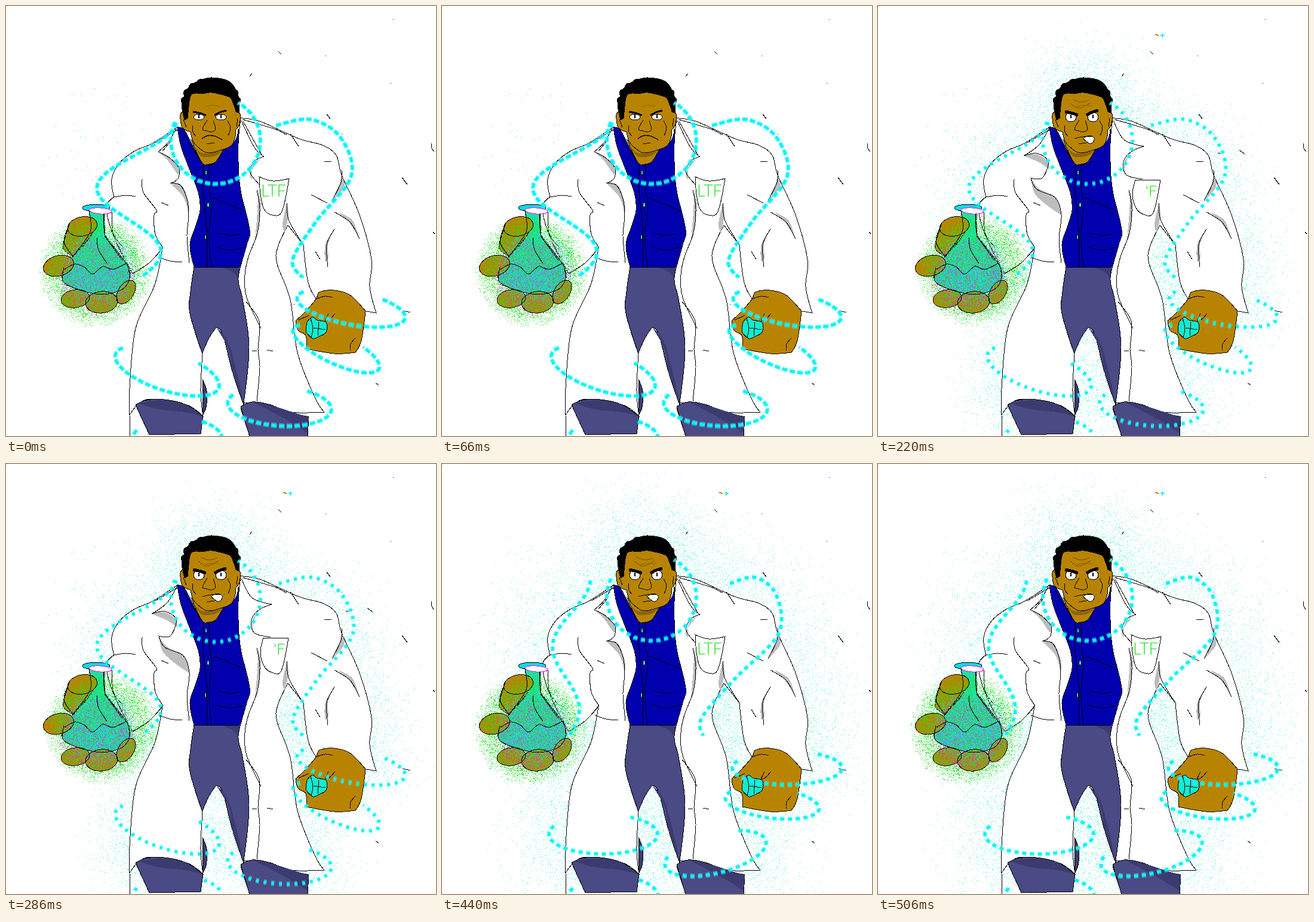
An HTML page that plays this animation: 720 by 720 pixels, repeating every 0.55 s.

```html
<!DOCTYPE html>
<html lang="en">
<head>
<meta charset="utf-8">
<title>Scientist with a flask</title>
<style>
html, body { margin: 0; width: 100%; height: 100%; overflow: hidden; background: #fff; }
svg { display: block; width: 100vw; height: 100vh; }
text { font-family: Lato, "Open Sans", sans-serif; font-weight: 300; fill: #1be01b; }
</style>
</head>
<body>
<svg id="stage" viewBox="0 0 720 720"></svg>
<script>
const STEP = 110, POSES = 5;
const SKIN = '#b88400', BLUE = '#0000ae', PANTS = '#4a4a84', DARK = '#3b3b70', GREY = '#bdbdbd', TEAL = '#10ecd0';
const stage = document.getElementById('stage');
const views = Array.from({ length: POSES }, () => []);

function add(parent, tag, attrs, text) {
  const el = document.createElementNS('http://www.w3.org/2000/svg', tag);
  for (const k in attrs) el.setAttribute(k, attrs[k]);
  if (text) el.textContent = text;
  parent.appendChild(el);
  return el;
}
// A layer without poses is always visible.
function layer(...poses) {
  const g = add(stage, 'g', { 'shape-rendering': 'crispEdges' });
  poses.forEach(i => views[i].push(g));
  return g;
}

// Smooth curve through "x,y" points; "!" marks a corner.
function curve(src, closed) {
  const p = src.split(' ').map(s => {
    const [x, y] = s.replace('!', '').split(',').map(Number);
    return { x, y, hard: s.endsWith('!') };
  });
  const n = p.length;
  const at = i => closed ? p[(i + n) % n] : p[Math.max(0, Math.min(n - 1, i))];
  const slope = i => {
    if (at(i).hard) return [0, 0];
    const a = at(i - 1), b = at(i + 1);
    return [(b.x - a.x) / 6, (b.y - a.y) / 6];
  };
  let d = `M${p[0].x} ${p[0].y}`;
  for (let i = 0; i < (closed ? n : n - 1); i++) {
    const a = at(i), b = at(i + 1), u = slope(i), v = slope(i + 1);
    d += `C${a.x + u[0]} ${a.y + u[1]} ${b.x - v[0]} ${b.y - v[1]} ${b.x} ${b.y}`;
  }
  return d + (closed ? 'Z' : '');
}
const shape = (g, src, fill, stroke = '#000') =>
  add(g, 'path', { d: curve(src, true), fill, stroke });
const lines = (g, src, stroke = '#000', width = 1) =>
  add(g, 'path', { d: src.split('|').map(s => curve(s)).join(''), fill: 'none', stroke, 'stroke-width': width });
const oval = (g, cx, cy, rx, ry, fill, turn = 0, stroke = '#000') =>
  add(g, 'ellipse', { cx, cy, rx, ry, fill, stroke, transform: `rotate(${turn} ${cx} ${cy})` });

function random(seed) {
  return () => {
    seed = seed + 0x6D2B79F5 | 0;
    let t = Math.imul(seed ^ seed >>> 15, 1 | seed);
    t = t + Math.imul(t ^ t >>> 7, 61 | t) ^ t;
    return ((t ^ t >>> 14) >>> 0) / 4294967296;
  };
}
// Single pixels placed by a rule that gets the random generator.
function dust(g, count, color, seed, place) {
  const rnd = random(seed);
  let d = '';
  for (let i = 0; i < count; i++) d += `M${place(rnd).map(Math.round).join(' ')}h1v1h-1z`;
  return add(g, 'path', { d, fill: color });
}
const disc = (x, y, r) => rnd => {
  const a = rnd() * 2 * Math.PI, q = r * Math.sqrt(rnd()) * (0.82 + 0.3 * rnd());
  return [x + q * Math.cos(a), y + q * Math.sin(a)];
};
const bell = rnd => (rnd() + rnd() + rnd() + rnd() - 2) * 1.7;

const auraLayers = [2, 3, 4].map(i => layer(i));

// Stray marks
const marks = layer();
lines(marks, '456,76 461,81|408,118 412,113|537,181 543,189|663,287 672,299|712,230 713,238 717,244|664,510 677,513|619,631 624,635|715,378 718,382');
dust(marks, 12, '#000', 9, r => [220 + 490 * r(), 620 * r() ** 2]);
dust(marks, 38, '#35e8e0', 5, disc(140, 230, 110));
dust(marks, 22, '#22e022', 6, disc(130, 220, 110));
add(marks, 'rect', { width: 1, height: 1, fill: '#ff8000' });
lines(layer(1, 2), '569,246 574,247|605,241 614,248');
const spark = layer(2, 3, 4);
lines(spark, '464,48 470,49', SKIN, 2);
lines(spark, '473,49 480,49|476,46 476,53', '#3fe8ff', 2);

// Shirt and trousers
const body = layer();
shape(body, '315,437! 390,437! 400,490 407,540 405,630 398,668! 379,612 363,550 352,538! 340,556 328,583! 308,515 309,478', PANTS);
shape(body, '352,538! 374,568 397,660! 379,612 374,577', DARK, 'none');
shape(body, '362,438! 391,438! 392,460! 380,446', DARK, 'none');
shape(body, '329,625! 336,645 335,672 329,685!', DARK);
shape(body, '286,203! 298,207 313,235 328,262 348,264 362,243 384,225 389,206! 396,300 412,370 392,438! 315,437! 304,410 318,340 290,270', BLUE);
lines(body, '331,266 330,310 336,370 337,437|341,265 341,310 345,330 340,385 344,437|346,321 404,345|355,380 375,384 392,382|352,403 375,409 397,404|297,212 313,240 330,262');
for (let i = 0; i < 3; i++) oval(body, 335 + i % 2 * 4 - i / 2, 279 + i * 54, 2, 4, '#35dfff');

// Coat
const coat = layer();
const coatLeft = shape(coat, '287,203! 245,230 215,243 190,263 177,290 181,320! 168,338 181,387 212,448! 240,430 262,405! 249,467 217,540 207,640 207,685! 235,659 300,667 330,687! 326,645 329,583! 308,515 309,478 315,437! 308,400 317,370 325,342 322,312 304,265 293,235', '#fff');
const coatRight = shape(coat, '393,188! 425,193 490,222 530,233 553,250 562,283 592,350 612,425 609,470 620,514! 603,511! 520,491! 506,463 498,400! 472,367! 455,404 454,432 476,492 488,580 517,655 533,680! 475,680 440,667 398,664! 407,570 396,490 389,455 403,400 408,375 394,315 390,285 389,230', '#fff');
shape(coat, '562,283! 566,303 546,326! 556,308', GREY, 'none');
shape(coat, '550,374! 539,398 540,422 534,428! 535,398', GREY, 'none');
shape(coat, '556,345! 580,359 592,390! 577,365', GREY, 'none');
shape(coat, '422,308! 427,335 423,368 417,390! 421,345', GREY, 'none');
shape(coat, '470,330! 473,350 467,380! 463,365', GREY, 'none');
lines(coat, '228,290 230,312 252,342 248,350 250,382 263,405|260,329 272,334|181,320 200,317 217,319|256,421 275,427 295,429|177,345 180,382 195,403');
lines(coat, '562,275 561,295 546,326|511,316 538,330|550,345 576,362 592,390|550,373 537,400 539,437|518,411 526,424|533,260 545,261|476,214 490,235|470,330 474,360 498,400');
lines(coat, '420,308 425,340 421,380 406,420 400,450 403,488 427,540|402,495 424,528 422,575 425,605 420,662|412,577 420,577|437,576 447,578|396,190 450,206 470,216|289,206 250,229|393,674 408,720|207,685 208,720');
shape(coat, '217,668! 235,660 265,659 300,667 330,687! 326,716! 240,718! 228,692', PANTS);
shape(coat, '222,665! 260,660 300,667 329,687! 300,680 255,675', DARK, 'none');
shape(coat, '393,671! 412,663 440,667 475,680 507,688! 505,721! 408,721!', PANTS);
shape(coat, '415,664! 445,669 507,689! 505,715! 465,690', DARK, 'none');

// Lapels
const calm = layer(0, 3, 4);
shape(calm, '255,244! 272,252 291,270! 288,282 272,260', GREY, 'none');
shape(calm, '275,297! 294,300 306,330 306,350! 297,320', GREY, 'none');
shape(calm, '427,255! 413,268 412,290! 408,280', GREY, 'none');
lines(calm, '285,205 272,228 255,244! 275,255 291,272! 288,289 275,297! 292,300 303,323 306,350 303,385 307,430|394,192 416,237 432,252! 416,260 409,279 424,299|277,225 262,243|397,193 428,249');
const gust = layer(1);
shape(gust, '278,287! 292,300 305,330 302,340! 291,310', GREY, 'none');
lines(gust, '287,204 250,235! 255,251 276,260 286,273 264,291! 276,306 294,313 306,345 303,390 307,430|394,192 411,220 437,229! 434,246 415,260 418,288 436,291');
const storm = layer(2);
shape(storm, '244,251! 265,248 284,260 287,274! 270,262', GREY, 'none');
shape(storm, '256,289! 270,306 299,323 307,350! 286,336 263,315', GREY, 'none');
shape(storm, '445,235! 420,252 413,276! 415,256', GREY, 'none');
lines(storm, '287,204 270,232 244,251! 267,247 285,261 275,288 256,288! 266,307 297,321 307,350 303,390 307,430|394,192 412,224 445,235! 424,244 411,261 416,283 443,290');

// Badge
const badge = layer(0, 3, 4), bent = layer(1, 2);
shape(badge, '424,286! 447,293 474,289! 462,344 446,350 432,340 426,315', '#fff');
shape(bent, '431,291! 473,291! 461,346 445,349 432,338 426,315', '#fff');
const label = (g, x, size, text) => add(g, 'text', { x, y: 319, 'font-size': size }, text);
label(badge, 427, 27, 'LTF');
label(layer(1), 432, 23, 'LTF');
label(layer(2), 448, 25, "'F");

// Head
const head = layer();
shape(head, '310,224! 328,262 340,265 352,260 364,240!', SKIN);
shape(head, '316,236! 330,247 361,243! 350,251 328,252', '#8c6400', 'none');
shape(head, '308,148! 340,144 376,151! 386,178! 392,181 391,198 385,207! 383,222 374,236 340,246 325,239 314,228 309,211! 295,203 292,182 298,178 304,188!', SKIN);
const hair = shape(head, '299,191! 294,165 299,150 305,137 317,128 343,120 375,127 389,151 391,165 390,178! 385,177! 382,164 375,153 345,145 329,147 315,146 308,154 304,188!', '#000');
for (let i = 0; i < 9; i++) {
  const a = Math.PI * (1.02 + i * 0.12);
  oval(head, 343 + 43 * Math.cos(a), 160 + 34 * Math.sin(a), 7, 6, '#000');
}
lines(head, '337,191 329,206 336,209 344,211 351,206 347,192|312,200 313,211 318,218|371,192 376,204 372,217|297,190 302,203|388,188 386,202|336,231 349,229');
lines(head, '333,169 345,166 358,168', '#8c6400');
function eyes(g, ry, brow) {
  for (const x of [323, 360]) {
    oval(g, x, 186, 9, ry, '#fff');
    oval(g, x, 185, 1, 3, '#087f9d');
  }
  lines(g, '313,177 323,179 335,183|349,183 358,178 369,175', '#000', brow);
}
eyes(layer(0, 1), 5, 3);
lines(layer(0), '328,222 338,217 350,218 362,224', '#000', 1.5);
lines(layer(1), '333,220 348,218 364,226', '#000', 3);
const angry = layer(2, 3, 4);
eyes(angry, 8, 5);
shape(angry, '343,222! 354,217 362,221 360,228 354,230', '#fff');
lines(angry, '329,222 343,219 360,219');
lines(angry, '322,163 335,171 345,168 356,162|326,156 340,161 354,157', '#7a5600');

// Fist with ring
const fist = layer();
shape(fist, '485,527! 500,513 519,491 525,479 549,476 576,484 602,511! 595,560 585,580! 550,582 503,574! 502,552 489,543', SKIN);
lines(fist, '518,491 534,486 547,488|523,531 540,526 551,515|540,515 532,532|576,577 577,566 585,556|490,526 507,518');
shape(fist, '503,547! 504,530 513,521 521,526 536,530 536,546 525,553 514,557', TEAL);
lines(fist, '510,523 514,540 511,555|515,539 535,542|524,529 522,552');

// Hand and flask
const hand = layer();
shape(hand, '97,440! 113,418 141,385 139,344! 164,346! 166,384! 188,413 205,438 206,460 190,477 150,482 98,464', '#1fe0a4');
shape(hand, '98,441! 115,432 131,437 145,449 162,436 179,441 203,430! 206,459 190,477 150,482 98,464', '#28cfc9');
shape(hand, '106,366! 97,395 97,408 113,420! 127,402 141,386 152,366!', SKIN);
oval(hand, 151, 338, 23, 6, '#08dce5');
oval(hand, 158, 343, 19, 5, '#fff', 4, '#f0f');
const fingers = [[128, 369, 25, 16, -12], [88, 435, 26, 17, -16], [116, 490, 24, 15, -8], [201, 479, 13, 22, 32], [160, 496, 27, 18, -6]];
for (const [x, y, rx, ry, turn] of fingers) oval(hand, x, y, rx, ry, SKIN, turn);

// Fizz around the flask: the cloud sways between poses
const sway = [0, -24, 10, -8, -2];
sway.forEach((dx, i) => {
  const g = layer(i);
  dust(g, 7600, '#1fe31f', 40 + i, disc(150 + dx, 443 - dx / 4, 86));
  dust(g, 2300, '#18e8d4', 60 + i, disc(158, 438, 60));
  dust(g, 1900, '#e22fe0', 50 + i, disc(152, 452, 64));
});
const ink = layer();
lines(ink, '139,344 141,378 113,418|97,438 98,464 150,482 190,477 206,460 205,438 188,413 166,384 164,346|98,441 115,432 131,437 145,449 162,436 179,441 203,430|212,448 240,430 263,405|106,366 97,395 113,420|165,385 195,426|152,388 155,408 169,431');
for (const [x, y, rx, ry, turn] of fingers) oval(ink, x, y, rx, ry, 'none', turn);

// Aura scattered around the outline of the figure
const rim = [coatLeft, coatRight, hair].flatMap(path => {
  const len = path.getTotalLength();
  return Array.from({ length: len / 8 | 0 }, (_, i) => path.getPointAtLength(i * 8));
});
auraLayers.forEach((g, i) => {
  const spread = i === 2 ? 48 : 36;
  dust(g, 15000 + i * 3000, '#4ff2cc', 20 + i, rnd => {
    const p = rim[rnd() * rim.length | 0];
    return [p.x + spread * bell(rnd), p.y + spread * bell(rnd)];
  });
});

// Energy trails: tilted rings around neck, wrist and legs, coils around the arms
const rad = Math.PI / 180;
function trace(point) {
  return 'M' + Array.from({ length: 41 }, (_, i) => point(i / 40).map(v => v.toFixed(1)).join(' ')).join('L');
}
const ring = (cx, cy, rx, ry, tilt) => trace(u => {
  const a = (205 - 265 * u) * rad, t = tilt * rad;
  const x = rx * Math.cos(a), y = ry * Math.sin(a);
  return [cx + x * Math.cos(t) - y * Math.sin(t), cy + x * Math.sin(t) + y * Math.cos(t)];
});
const coil = swing => trace(u => {
  const a = u * 2.35 * Math.PI;
  return [219 - 16 * u + swing * (66 - 14 * u) * Math.cos(a), 195 + 110 * a / Math.PI];
});
const armKeys = [[452, 200], [510, 190], [560, 220], [578, 285], [520, 360], [480, 425], [497, 455]];
const arm = (top, end) => curve(armKeys.map(([x, y], i) => `${x + top + (end - top) * i / 6},${y}`).join(' '));

const poses = [
  { tilt: 18, dash: 9, top: 0, end: 0, swing: 1, drop: 0 },
  { tilt: 8, dash: 9, top: 35, end: 85, swing: 1, drop: 15 },
  { tilt: 18, dash: 5, top: 5, end: 0, swing: 1, drop: 0 },
  { tilt: 12, dash: 6, top: 12, end: -14, swing: 1, drop: -2 },
  { tilt: 0, dash: 7, top: 30, end: -60, swing: 0.45, drop: -2 }
];
poses.forEach(({ tilt, dash, top, end, swing, drop }, i) => {
  const g = add(stage, 'g', { fill: 'none', 'stroke-dasharray': `${dash} ${13 - dash}` });
  views[i].push(g);
  const d = [
    ring(351, 225 + drop, 75, 73, 0), coil(swing), arm(top, end),
    ring(578, 509 - tilt / 5, 92, 28, tilt * 0.6), ring(553, 568 + tilt / 3, 79, 25, tilt + 7),
    ring(270, 620 - tilt / 2, 91, 33, tilt), ring(458, 652 + tilt, 87, 33, tilt - 14),
    ring(287, 725, 75, 35, 0)
  ].join('');
  add(g, 'path', { d, stroke: '#50ffff', 'stroke-width': 9, opacity: 0.4 });
  add(g, 'path', { d, stroke: '#00f5ff', 'stroke-width': 5 });
});

const all = new Set(views.flat());
function render(time) {
  const pose = Math.floor(time / STEP) % POSES;
  for (const g of all) g.style.display = views[pose].includes(g) ? '' : 'none';
}
const start = performance.now();
function tick() {
  render(performance.now() - start);
  requestAnimationFrame(tick);
}
tick();
</script>
</body>
</html>
```
